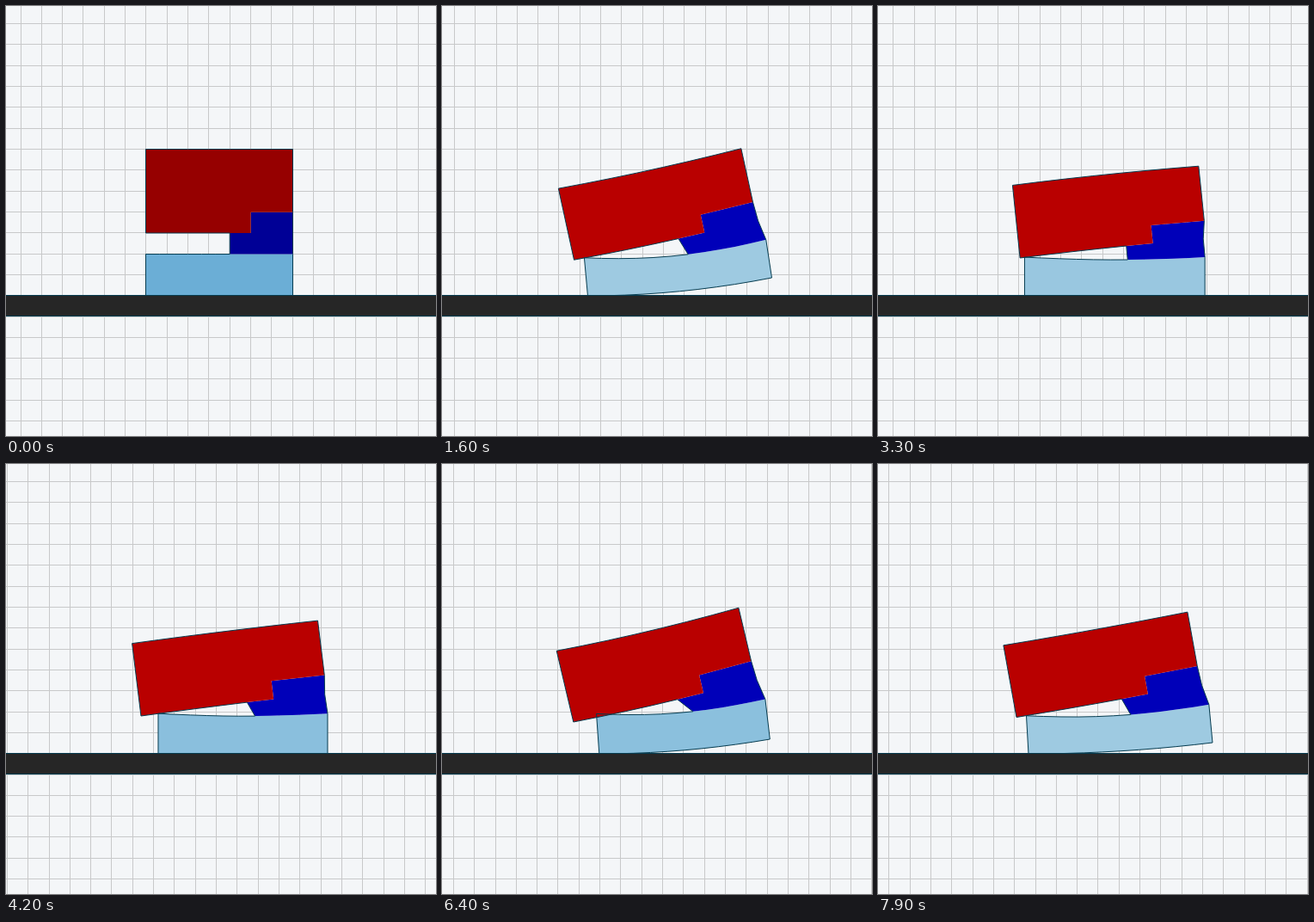
An HTML page with a canvas that plays this animation: 500 px wide and 500 px high, repeating every 8 s.

```html
<!DOCTYPE html>
<html lang="en">
<head>
<meta charset="utf-8">
<title>Soft walker</title>
<style>
html, body { margin: 0; width: 100%; height: 100%; overflow: hidden; background: #f4f6f8; }
canvas { display: block; width: 500px; height: 500px; }
</style>
</head>
<body>
<canvas id="stage" width="500" height="500"></canvas>
<script>
const ctx = document.getElementById('stage').getContext('2d');
const CELL = 24.32, STEP = 100, STEPS = 80, CYCLE = 7, GROUND = 337;
const LINE = '#063c50';

// x, y: lower left corner of the slab; left, width, rise: the foot on the ground
const rest = { x: 162.5, y: 264, tilt: 0, left: 162.5, width: 171, rise: 0, load: 0 };
const stride = [
  { at: 0, x: 158, y: 293, tilt: 7, left: 178, width: 197, rise: 0, load: 1 },
  { at: 1, x: 155, y: 300, tilt: 13.3, left: 185, width: 198.5, rise: 17, load: 1 },
  { at: 2, x: 164, y: 294.5, tilt: 10.25, left: 178, width: 214, rise: 13, load: 1 },
  { at: 4, x: 169.5, y: 293, tilt: 5.3, left: 167.5, width: 216, rise: 0, load: 1 }
];
const cameraKeys = [[0, 0], [9, 24.59], [23, 29.32], [42, 64.26], [53, 75.58], [64, 100.9], [79, 125.82]];

const lerp = (a, b, k) => a + (b - a) * k;
const clamp = v => Math.min(1, Math.max(0, v));
const blend = (a, b, k) =>
  Object.fromEntries(Object.keys(rest).map(key => [key, lerp(a[key], b[key], k)]));
const range = (from, to, count, f) =>
  Array.from({ length: count + 1 }, (_, i) => f(lerp(from, to, i / count)));

function cameraAt(n) {
  const i = Math.max(1, cameraKeys.findIndex(key => key[0] >= n));
  const [t0, a] = cameraKeys[i - 1], [t1, b] = cameraKeys[i];
  return lerp(a, b, (n - t0) / (t1 - t0));
}

function strideAt(phase) {
  const i = stride.findLastIndex(s => s.at <= phase);
  const a = stride[i], b = stride[(i + 1) % stride.length];
  const end = b.at || CYCLE;
  return blend(a, b, (phase - a.at) / (end - a.at));
}

function poseAt(n) {
  const pose = strideAt(n % CYCLE);
  // the first strides tip higher and lag behind, then settle
  const early = clamp((23 - n) / 14);
  const kick = pose.rise * early;
  const drift = -21.7 * early - 0.0536 * (n - 23);
  pose.x += drift;
  pose.left += drift + 0.3 * kick;
  pose.y += 0.11 * kick;
  pose.tilt += 0.32 * kick;
  pose.rise += 1.23 * kick;
  return blend(rest, pose, clamp(n / 2));
}

function path(points) {
  ctx.beginPath();
  points.forEach(p => ctx.lineTo(...p));
  ctx.closePath();
}

function fill(rgb, points) {
  path(points);
  ctx.fillStyle = `rgb(${rgb.map(Math.round)})`;
  ctx.fill();
}

function drawGrid(camera) {
  ctx.fillStyle = '#f4f6f8';
  ctx.fillRect(0, 0, 500, 500);
  ctx.fillStyle = '#c8c9ca';
  const start = ((17.02 - camera) % CELL + CELL) % CELL;
  for (let x = start; x < 500; x += CELL) ctx.fillRect(Math.floor(x), 0, 1, 500);
  for (let y = 20.55; y < 500; y += CELL) ctx.fillRect(0, Math.floor(y), 500, 1);
}

function drawWalker({ x, y, tilt, left, width, rise, load }) {
  const angle = tilt * Math.PI / 180;
  const cos = Math.cos(angle), sin = Math.sin(angle);
  const w = lerp(171, 217.5, load), h = lerp(97.5, 85, load);
  const sag = load * (tilt - 8.5) / 2;
  // u runs along the slab, v from its bottom up
  const slab = (u, v) => [
    x + w * u * cos - h * v * sin,
    y - w * u * sin - h * v * cos + 4 * sag * u * (1 - u)
  ];

  const thick = lerp(48.5, 46.5 - (width - 199) * 0.15, load);
  const sole = t => [left + width * t, GROUND - rise * t * t];
  const instep = t => {
    const [sx, sy] = sole(t);
    const lean = 0.32 * rise * (0.6 + 0.4 * t);
    return [sx - lean, sy - thick + 3 * load * Math.sin(Math.PI * t)];
  };

  const top = range(0, 1, 7, u => slab(u, 1));
  const hip = slab(1, 0.25), toe = instep(1);
  const knee = [(hip[0] + toe[0]) / 2 - 1.5 * load, (hip[1] + toe[1]) / 2];
  const underside = range(4 / 7, 0, 4, u => slab(u, 0));
  const notch = [slab(5 / 7, 0.25), slab(5 / 7, 0)];
  const bottom = range(1, 0, 10, sole);
  const back = range(0, 4 / 7, 6, instep);
  const front = range(1, 4 / 7, 5, instep);

  const dark = [107, 174, 214], pale = [160, 203, 226];
  const stretch = clamp((width - 171) / 45);
  const body = lerp(150, 185, load);
  fill(dark.map((c, i) => lerp(c, pale[i], stretch)), [...back, ...front.reverse(), ...bottom]);
  front.reverse();
  fill([0, 0, body], [notch[0], hip, knee, ...front, underside[0], notch[1]]);
  fill([body, 0, 0], [...top, hip, ...notch, ...underside]);

  path([...top, hip, knee, toe, ...bottom, ...back, ...underside]);
  ctx.strokeStyle = LINE;
  ctx.stroke();
}

function drawGround() {
  ctx.fillStyle = LINE;
  ctx.fillRect(0, 336, 500, 25);
  ctx.fillStyle = '#262626';
  ctx.fillRect(0, 337, 500, 23);
}

const begin = performance.now();

function frame() {
  const n = Math.floor((performance.now() - begin) / STEP) % STEPS;
  drawGrid(cameraAt(n));
  drawWalker(poseAt(n));
  drawGround();
  requestAnimationFrame(frame);
}

frame();
</script>
</body>
</html>
```
